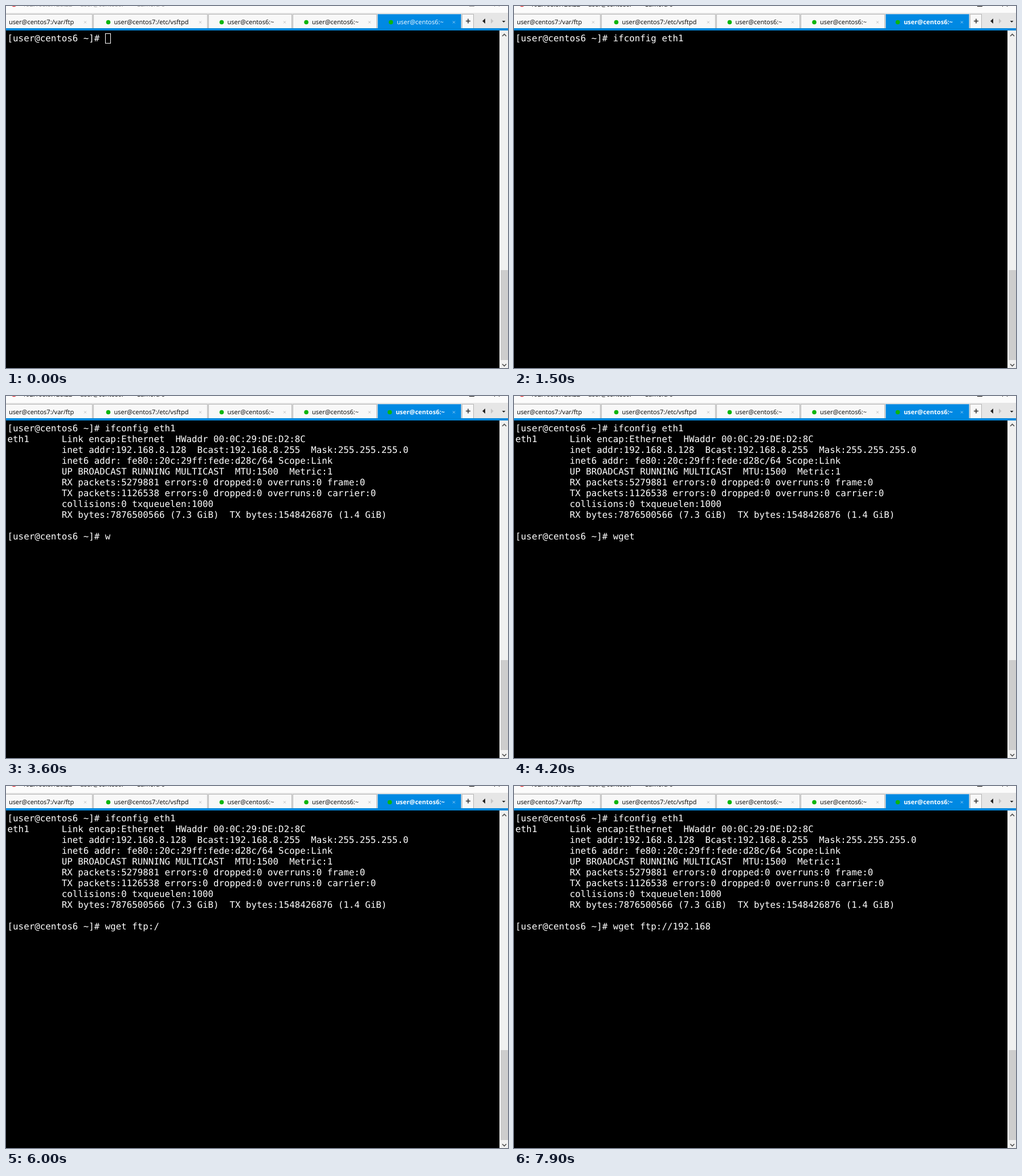
Recreate the animation shown at these times as an HTML page. Size 881 px wide and 636 px high, loop 8 s.

```html
<!DOCTYPE html>
<html lang="en">
<head>
<meta charset="utf-8">
<title>Terminal session</title>
<style>
html, body { margin: 0; width: 100%; height: 100%; overflow: hidden; background: #000; }
svg { display: block; }
rect { shape-rendering: crispEdges; }
text { white-space: pre; text-rendering: geometricPrecision; }
.ui { font: 11px "Open Sans", sans-serif; }
.label { text-anchor: middle; }
#terminal { font: 15.81px "DejaVu Sans Mono", monospace; fill: #fff; }
.chevron { fill: none; stroke: #505050; stroke-width: 1.6; }
</style>
</head>
<body>
<svg width="881" height="636" viewBox="0 0 881 636">
  <rect width="881" height="636"/>
  <rect width="881" height="12" fill="#fbfbfb"/>
  <circle cx="14" cy="-4" r="5.5" fill="#e5353b"/>
  <g id="titleBar" class="ui">
    <text x="29" y="1">192.168.8.128:22 -</text>
    <text x="130" y="1">user@centos6:~ -</text>
    <text x="230" y="1">Lumora 6</text>
    <rect x="813" width="9" height="1"/>
    <rect x="857" width="1" height="1"/>
    <rect x="865" width="1" height="1"/>
  </g>

  <rect y="12" width="881" height="28" fill="#e6e6e6"/>
  <g id="tabs" class="ui"></g>
  <rect x="800.5" y="14.5" width="20" height="25" fill="#f8f8f8" stroke="#b4b4b4"/>
  <path d="M807 26.5h8M811 22.5v8" stroke="#333" stroke-width="1.6"/>
  <path d="M841 22v9l-5-4.5z" fill="#222"/>
  <path d="M851 22v9l4.5-4.5z" fill="#c4c4c4"/>
  <path d="M870.5 26h6l-3 3z" fill="#222"/>
  <rect y="39" width="881" height="4" fill="#0087dc"/>

  <rect x="866" y="43" width="15" height="593" fill="#f0f0f0"/>
  <rect x="868" y="464" width="13" height="158" fill="#cdcdcd"/>
  <path class="chevron" d="M871 53l3.5-3.5l3.5 3.5M871 629l3.5 3.5l3.5-3.5"/>

  <g id="terminal"></g>
  <rect id="cursor" x="174.5" y="48.5" width="9" height="17" fill="none" stroke="#fff"/>
</svg>
<script>
const LOOP = 8000, FOCUS_AT = 200, COMMAND_AT = 1500, OUTPUT_AT = 2200;
const PROMPT = "[user@centos6 ~]# ";
const COMMAND = "ifconfig eth1";
const OUTPUT = `eth1      Link encap:Ethernet  HWaddr 00:0C:29:DE:D2:8C
          inet addr:192.168.8.128  Bcast:192.168.8.255  Mask:255.255.255.0
          inet6 addr: fe80::20c:29ff:fede:d28c/64 Scope:Link
          UP BROADCAST RUNNING MULTICAST  MTU:1500  Metric:1
          RX packets:5279881 errors:0 dropped:0 overruns:0 frame:0
          TX packets:1126538 errors:0 dropped:0 overruns:0 carrier:0
          collisions:0 txqueuelen:1000
          RX bytes:7876500566 (7.3 GiB)  TX bytes:1548426876 (1.4 GiB)
`.split("\n");
const TYPED = "wget ftp://192.168";
// One keystroke time per character of TYPED.
const KEY_TIMES = [3600, 3900, 4100, 4200, 4700, 4700, 5000, 5100, 5800,
  6000, 6200, 7100, 7200, 7300, 7500, 7600, 7800, 7900];

const byId = id => document.getElementById(id);

function add(parent, tag, attributes, content = "") {
  const node = document.createElementNS("http://www.w3.org/2000/svg", tag);
  for (const [key, value] of Object.entries(attributes)) node.setAttribute(key, value);
  node.textContent = content;
  return parent.appendChild(node);
}

function addTab({ x, width, center, dotX, closeX, title, active }) {
  const tabs = byId("tabs");
  add(tabs, "rect", { x: x + 0.5, y: 14.5, width: width - 1, height: 25,
    fill: active ? "#0089e3" : "#f8f8f8", stroke: active ? "#5aa9de" : "#b4b4b4" });
  const dot = dotX && add(tabs, "circle", { cx: dotX, cy: 28.5, r: 3.8, fill: "#0db50d" });
  const label = add(tabs, "text", { class: "label", x: center, y: 32,
    fill: active ? "#fff" : "#000" }, title);
  add(tabs, "path", { d: `M${closeX - 2} 26.5l4 4m0-4l-4 4`,
    stroke: active ? "#8cc9f3" : "#c0c0c0" });
  return { dot, label };
}

addTab({ x: -1, width: 153, center: 62, closeX: 139, title: "user@centos7:/var/ftp" });
addTab({ x: 153, width: 201, center: 255, dotX: 179.5, closeX: 341, title: "user@centos7:/etc/vsftpd" });
addTab({ x: 355, width: 147, center: 429.5, dotX: 378.5, closeX: 489, title: "user@centos6:~" });
addTab({ x: 503, width: 148, center: 578, dotX: 527, closeX: 638, title: "user@centos6:~" });
const activeTab = addTab({ x: 652, width: 147, center: 727, dotX: 675.5, closeX: 786,
  title: "user@centos6:~", active: true });

const rows = Array.from({ length: 11 }, (_, i) =>
  add(byId("terminal"), "text", { x: 2.6, y: 62 + 19 * i }));

function draw(time) {
  const focused = time >= FOCUS_AT;
  byId("titleBar").setAttribute("fill", focused ? "#000" : "#999");
  activeTab.label.setAttribute("font-weight", focused ? 700 : 400);
  activeTab.dot.setAttribute("cx", focused ? 673.5 : 675.5);

  const entered = time >= COMMAND_AT;
  byId("cursor").setAttribute("visibility", entered ? "hidden" : "visible");
  const lines = [PROMPT + (entered ? COMMAND : "")];
  if (time >= OUTPUT_AT) {
    const typedCount = KEY_TIMES.filter(keyTime => time >= keyTime).length;
    lines.push(...OUTPUT, PROMPT + TYPED.slice(0, typedCount));
  }
  rows.forEach((row, i) => {
    const line = lines[i] || "";
    if (row.textContent !== line) row.textContent = line;
  });
}

const start = performance.now();
function tick() {
  draw((performance.now() - start) % LOOP);
  requestAnimationFrame(tick);
}
tick();
</script>
</body>
</html>
```
